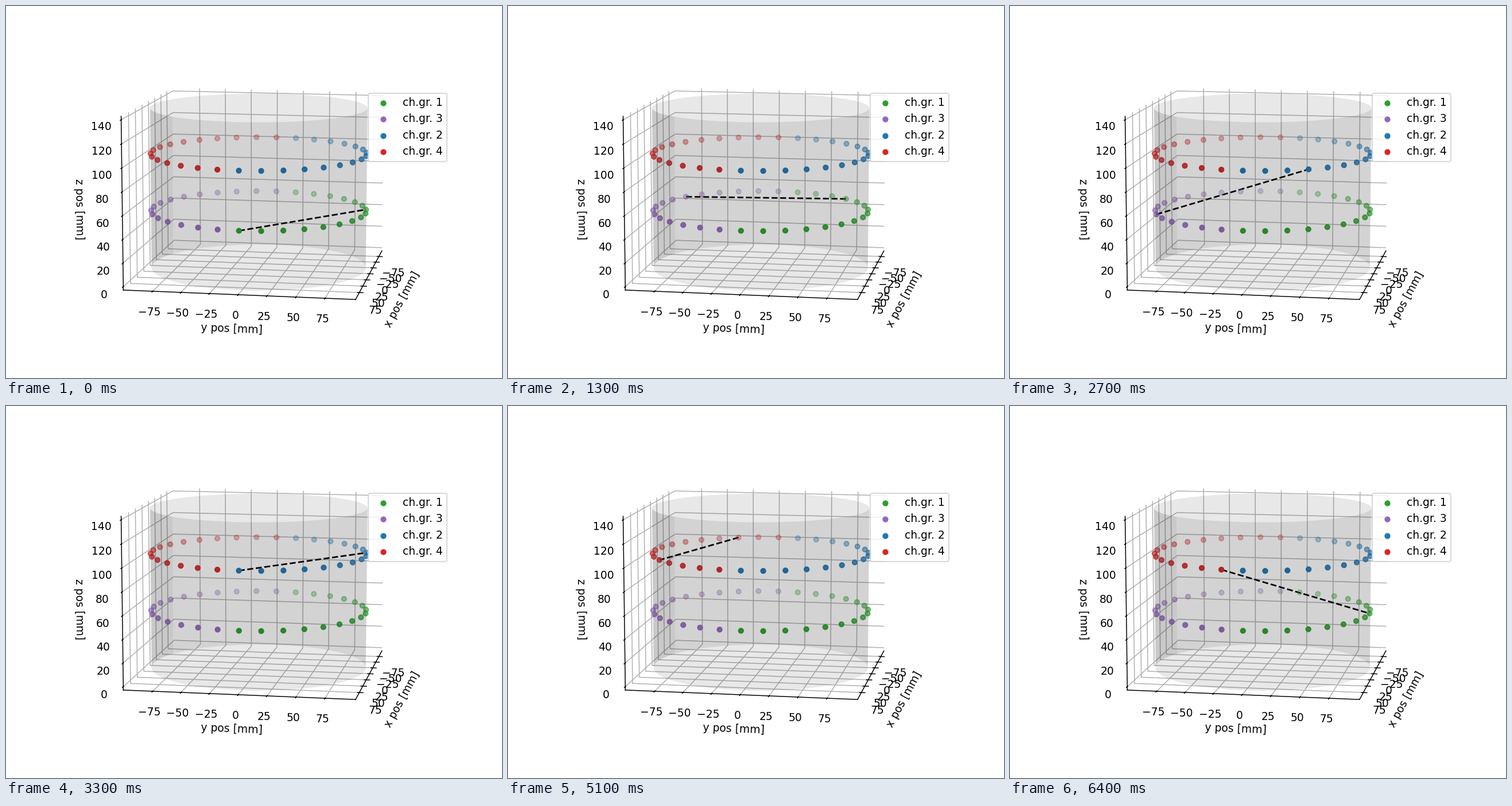
Animation, 864 px wide and 648 px high, one loop 6.5 s. Source, as a matplotlib script:

```python
import numpy as np
import matplotlib.pyplot as plt
from matplotlib.animation import FuncAnimation
from mpl_toolkits.mplot3d.art3d import Poly3DCollection

W, H, DPI = 864, 648, 135
PAD = 20.25              # margin around the axes, px
RADIUS, HEIGHT = 97, 140
PER_RING, SKIP = 32, 9   # electrodes per ring, offset between a pair
MARGIN = 25 / 24         # axes reach slightly beyond the data
VIEW = 10                # elevation and azimuth, degrees


def on_wall(degrees, z):
    """Points on the cylinder at the given angles and height."""
    a = np.radians(degrees)
    return np.column_stack([RADIUS * np.cos(a), RADIUS * np.sin(a), np.full(a.shape, z)])


def add_wall(ax, top, bottom, alpha, shade=0.12):
    """Translucent piece of wall between a top arc and a bottom arc."""
    verts = np.vstack([on_wall(np.linspace(*top, 90), HEIGHT),
                       on_wall(np.linspace(*bottom, 90), 0)])
    ax.add_collection3d(Poly3DCollection(
        [verts], facecolors=[(shade, shade, shade, alpha)], linewidths=0, zorder=4))


fig = plt.figure(figsize=(W / DPI, H / DPI), dpi=DPI, facecolor="white")
ax = fig.add_axes([PAD / W, PAD / H, 1 - 2 * PAD / W, 1 - 2 * PAD / H],
                  projection="3d", computed_zorder=False)
ax.view_init(elev=VIEW, azim=VIEW)

# Electrodes: lower ring first, then the upper ring
ring = np.arange(PER_RING) * 360 / PER_RING
points = np.vstack([on_wall(ring, 50), on_wall(ring, 100)])

groups = [(1, 0, "tab:green"), (3, 16, "tab:purple"),
          (2, 32, "tab:blue"), (4, 48, "tab:red")]
for number, start, color in groups:
    x, y, z = points[start:start + 16].T
    ax.scatter(x, y, z, color=color, label=f"ch.gr. {number}", zorder=3)

# Far and near halves of the cylinder, split at its silhouette
edge = 86.8
left, right = VIEW - edge, VIEW + edge
add_wall(ax, (right, left + 360), (left + 360, right), 0.1)
add_wall(ax, (left, right), (right, left), 0.1)
# Darker strip in front of the side pane
add_wall(ax, (left, -40), (245.7, left + 360), 0.055)

for axis in (ax.xaxis, ax.yaxis, ax.zaxis):
    axis.set_pane_color((1, 1, 1, 0))
ax.set_xticks(range(-75, 76, 25))
ax.set_yticks(range(-75, 76, 25))
ax.set_zticks(range(0, 141, 20))
reach, half = RADIUS * MARGIN, HEIGHT / 2
ax.set_xlim(-reach, reach)
ax.set_ylim(-reach, reach)
ax.set_zlim(half - half * MARGIN, half + half * MARGIN)
ax.set_xlabel("x pos [mm]")
ax.set_ylabel("y pos [mm]")
ax.set_zlabel("z pos [mm]")

ax.legend(loc="upper left", bbox_to_anchor=(631 / W, 1 - 151.5 / H),
          bbox_transform=fig.transFigure, borderaxespad=0)

link, = ax.plot([], [], [], "k--", zorder=2)


def update(frame):
    # The first pair is held for two steps
    first = max(0, frame - 1)
    pair = points[[first, (first + SKIP) % len(points)]]
    link.set_data_3d(*pair.T)
    return link,


anim = FuncAnimation(fig, update, frames=len(points) + 1, interval=100,
                     init_func=lambda: update(0), repeat=True, repeat_delay=0)
plt.show()
```
